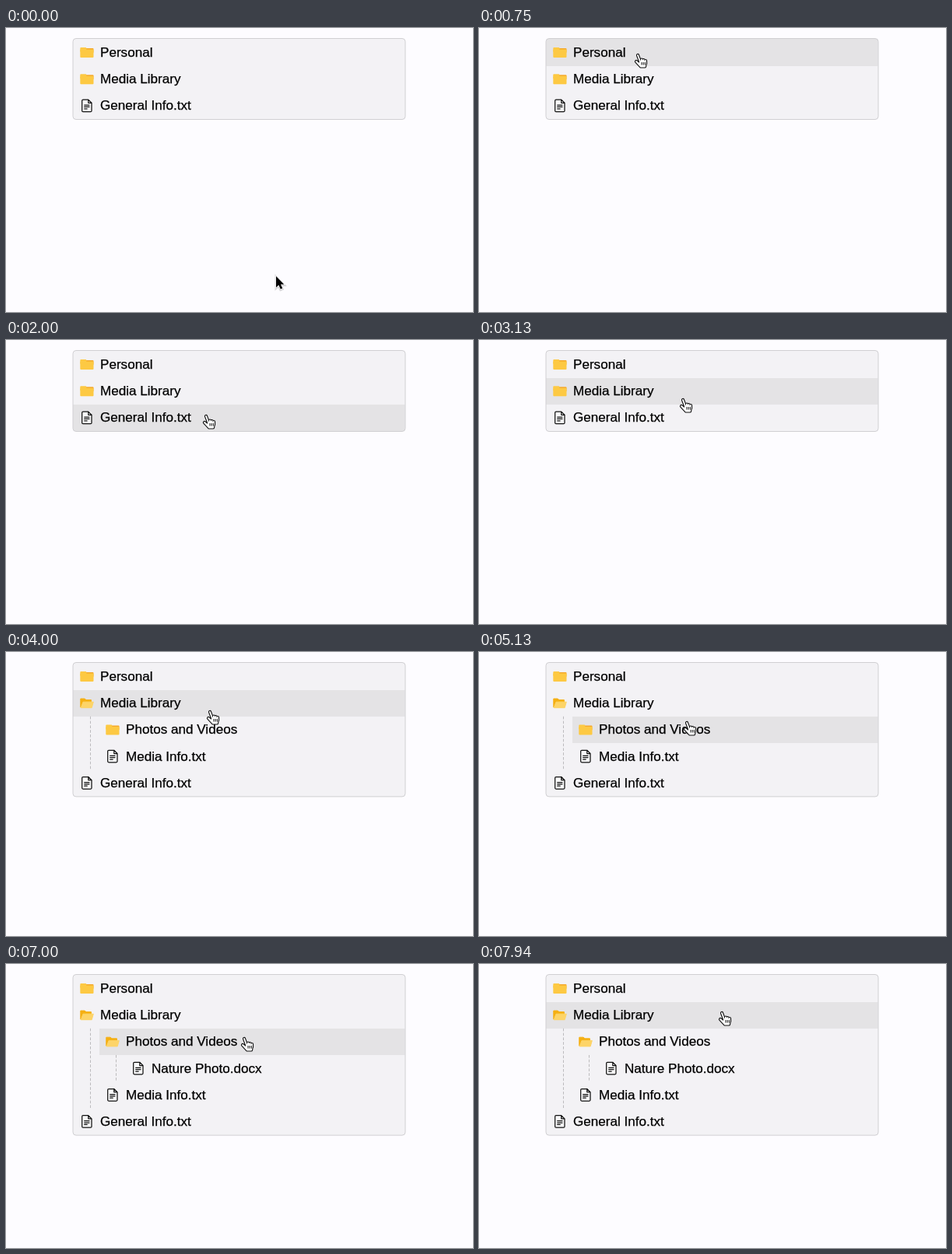
An HTML page for the animation above (8 s loop, 600 by 365 pixels).

```html
<!DOCTYPE html>
<html lang="en">
<head>
<meta charset="utf-8">
<title>File tree</title>
<style>
  html, body { margin: 0; width: 100%; height: 100%; overflow: hidden; background: #fdfcff; }
  svg { display: block; width: 600px; height: 365px; }
  text { font: 17.1px "Liberation Sans", Arial, sans-serif; fill: #000; stroke: #000; stroke-width: .25; }
</style>
</head>
<body>
<svg viewBox="0 0 600 365">
  <defs>
    <g id="closed">
      <rect x="5" y="1.3" width="12.5" height="6" rx="1" fill="#f5a92b"/>
      <rect x=".3" y=".3" width="8" height="6" rx="1" fill="#fdc943"/>
      <rect x=".3" y="2.7" width="17.2" height="10.5" rx="1" fill="#fdc943"/>
    </g>
    <g id="open" stroke-linejoin="round">
      <path d="M.8 1H6L8 2.6H14.4V12H.8Z" fill="#f5b013" stroke="#f5b013"/>
      <path d="M4 5.2H17.3L15.2 12.7H1.2Z" fill="#fdd468" stroke="#fdd468"/>
    </g>
    <g id="file" fill="none" stroke="#111" stroke-width="1.25" stroke-linejoin="round" stroke-linecap="round">
      <rect x=".7" y=".7" width="12.3" height="15.5" rx="1.5" fill="#f9f9fa" stroke="none"/>
      <path d="M8.8.7H2Q.7.7.7 2V15Q.7 16.2 2 16.2H11.7Q13 16.2 13 15V4.9L8.8.7V4.9H13M3.7 7.7h6.3M3.7 10h6.3M3.7 12.4h3.5"/>
    </g>
    <path id="pointerShape" d="M0 0V14.4L3.3 11.3 5.7 16.6 8.2 15.5 5.9 10.4H10.3Z"/>
    <path id="handShape" stroke-linejoin="round" stroke-linecap="round"
      d="M4 2 7 10M9 7.5V12M11.5 8V12M14 9V13M2 10 8 16.5H13L14 11 11 9 7 10V14Z"/>
    <clipPath id="inside"><use href="#panel"/></clipPath>
  </defs>
  <rect id="panel" x="86" y="13.5" width="427" rx="4" fill="#f3f2f5"/>
  <g clip-path="url(#inside)"><rect id="hover" fill="#e4e3e5"/></g>
  <rect id="frame" x="86" y="13.5" width="427" rx="4" fill="none" stroke="#d0cfd2"/>
  <g id="tree"></g>
  <g id="cursor">
    <g id="arrow">
      <use href="#pointerShape" y="1" fill="none" stroke="#000" stroke-opacity=".14" stroke-width="3"/>
      <use href="#pointerShape" stroke="#fff" stroke-width="1.1" paint-order="stroke"/>
    </g>
    <g id="hand" transform="translate(-6 -2)">
      <use href="#handShape" stroke="#111" stroke-width="4.2"/>
      <use href="#handShape" fill="#fff" stroke="#fff" stroke-width="2"/>
      <path d="M9 11v3.5M11.2 11v3.5M13.4 11v3.5" stroke="#111"/>
    </g>
  </g>
</svg>
<script>
const LOOP = 8000, STEP = 62.5, GLIDE = 600;
const TOP = 14.4, ROW = 34.2, INDENT = 33;
const OPEN_MEDIA = 3300, OPEN_PHOTOS = 6125;
const $ = id => document.getElementById(id);

const home = { x: 347, y: 319 };
const stops = [
  { at: 740, x: 206, y: 35 },
  { at: 1630, x: 259, y: 99 },
  { at: 2560, x: 263, y: 45 },
  { at: 3110, x: 264, y: 77 },
  { at: 5000, x: 269, y: 91 },
  { at: 6370, x: 308, y: 96 },
  { at: 7930, x: 314, y: 63 }
];

function ease(u) {
  const c = Math.min(1, Math.max(0, u));
  return c * c * (3 - 2 * c);
}

// Sums the eased moves, so neighbouring glides may overlap smoothly.
function pointer(t) {
  let { x, y } = home, from = home;
  for (const stop of stops) {
    const e = ease((t - stop.at + GLIDE) / GLIDE);
    x += (stop.x - from.x) * e;
    y += (stop.y - from.y) * e;
    from = stop;
  }
  return { x: Math.round(x), y: Math.round(y) };
}

const folder = (label, open, children) =>
  ({ label, icon: open ? "open" : "closed", children: open ? children : [] });
const file = label => ({ label, icon: "file", children: [] });

const buildTree = (media, photos) => [
  folder("Personal", false, []),
  folder("Media Library", media, [
    folder("Photos and Videos", photos, [file("Nature Photo.docx")]),
    file("Media Info.txt")
  ]),
  file("General Info.txt")
];

// Lists the visible rows; span counts the rows nested below each one.
function flatten(nodes, depth = 0) {
  return nodes.flatMap(node => {
    const nested = flatten(node.children, depth + 1);
    return [{ ...node, depth, span: nested.length }, ...nested];
  });
}

function rowMarkup({ label, icon, depth, span }, i) {
  const x = 95 + depth * INDENT, y = TOP + i * ROW;
  const [dx, dy] = icon === "file" ? [2, 8.6] : [0, 10.4];
  const guide = `<path d="M${x + 13.5} ${y + ROW}v${span * ROW}" stroke="#bcbbbd" stroke-dasharray="3.6 2.2"/>`;
  return `<use href="#${icon}" x="${x + dx}" y="${y + dy}"/>` +
    `<text x="${x + 26}" y="${y + 22.6}">${label}</text>` + (span ? guide : "");
}

function setAttributes(id, attributes) {
  for (const name in attributes) $(id).setAttribute(name, attributes[name]);
}

let shown = "";
function drawTree(rows) {
  const markup = rows.map(rowMarkup).join("");
  if (markup === shown) return;
  shown = markup;
  $("tree").innerHTML = markup;
  const height = rows.length * ROW + 1.4;
  setAttributes("panel", { height });
  setAttributes("frame", { height });
}

function drawHover(row, i) {
  const x = row?.depth ? 87 + row.depth * INDENT : 86;
  const y = Math.round(TOP + i * ROW), bottom = Math.round(TOP + (i + 1) * ROW);
  setAttributes("hover", { x, y, width: 512.5 - x, height: row ? bottom - y : 0 });
}

function render(time) {
  const t = Math.floor((time % LOOP) / STEP) * STEP;
  const rows = flatten(buildTree(t >= OPEN_MEDIA, t >= OPEN_PHOTOS));
  const { x, y } = pointer(t);
  const index = Math.floor((y - TOP) / ROW), row = rows[index];
  drawTree(rows);
  drawHover(row, index);
  setAttributes("cursor", { transform: `translate(${x} ${y})` });
  $("hand").style.display = row ? "" : "none";
  $("arrow").style.display = row ? "none" : "";
}

const start = performance.now();
function tick() {
  render(performance.now() - start);
  requestAnimationFrame(tick);
}
tick();
</script>
</body>
</html>
```
